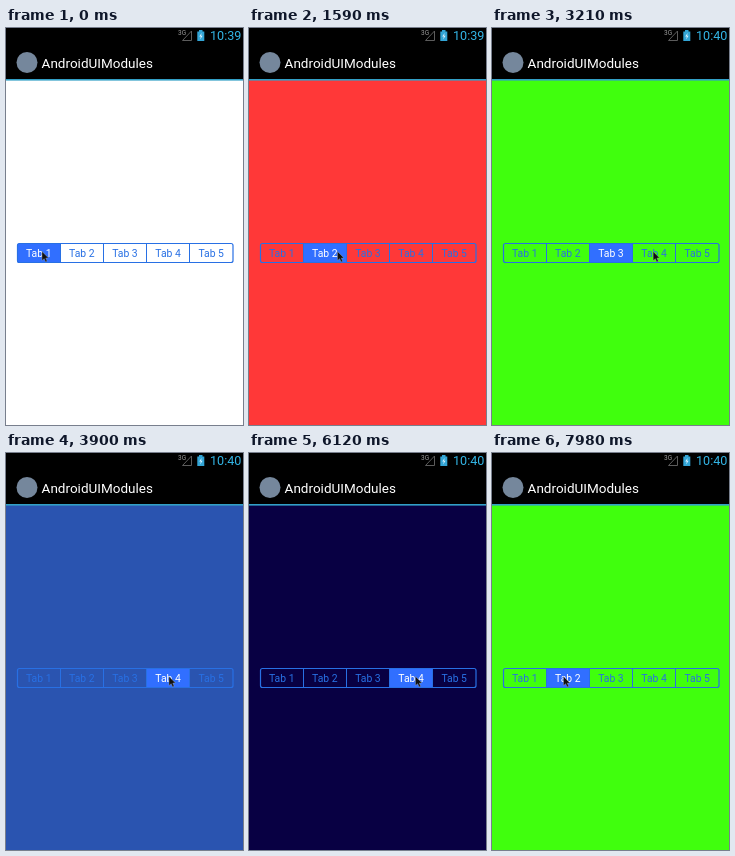
An HTML page that plays this animation: 237x397 px, repeating every 8000 ms.

```html
<!DOCTYPE html>
<html lang="en">
<head>
<meta charset="utf-8">
<style>
  html, body { margin: 0; width: 100%; height: 100%; overflow: hidden; background: #fff; }
  svg { display: block; width: 237px; height: 397px; font-family: Roboto, sans-serif; }
</style>
</head>
<body>
<svg viewBox="0 0 237 397">
  <rect id="page" width="237" height="397"/>
  <rect width="237" height="52" fill="#000"/>
  <rect y="51" width="237" height="1.6" fill="#329fc6"/>

  <text x="172" y="6.8" font-size="6.5" fill="#999">3G</text>
  <path d="M176.5 12.5H185.5V3Z" fill="none" stroke="#5c5c5c"/>
  <path d="M193 2h3.5v1.5h1.8v9.5h-7v-9.5h1.7z" fill="#33a5d6"/>
  <path d="M195.6 5l-2.4 3.4h1.6l-.6 3 2.4-3.6h-1.5z" fill="#d8f2ff"/>
  <text id="clock" x="204" y="12" font-size="12.6" fill="#33b5e5"></text>

  <circle cx="21" cy="34.5" r="10.5" fill="#75879c"/>
  <text x="35.6" y="39.5" font-size="13.5" fill="#fff">AndroidUIModules</text>

  <g id="tabs" font-size="10.4" text-anchor="middle"></g>
  <path id="cursor" d="M0 0V9L2.2 7.2 3.6 10.4 5.1 9.7 3.8 6.6 6.4 6.4Z" fill="#111" stroke="#aaa" stroke-width=".4"/>
</svg>
<script>
const LOOP = 8000, FADE = 500, MOVE = 330, TAB_W = 43.1, LEFT = 11.5;
const INK = '#2870e4', FILL = '#316fff';
const COLORS = [[255, 255, 255], [255, 0, 0], [64, 255, 13], [32, 0, 255], [0, 0, 0]];
const $ = id => document.getElementById(id);

// The cursor reaches x at `arrive`, the tab lights at `pick`, the page starts fading at `fade`.
const steps = [
  { tab: 1, x: 88.5, arrive: 810, pick: 1200, fade: 1200 },
  { tab: 2, x: 115.5, arrive: 2010, pick: 2250, fade: 2330 },
  { tab: 3, x: 163, arrive: 3250, pick: 3330, fade: 3565 },
  { tab: 4, x: 201.5, arrive: 4480, pick: 4560, fade: 4785 },
  { tab: 3, x: 166.5, arrive: 5640, pick: 5730, fade: 5990 },
  { tab: 2, x: 116, arrive: 6700, pick: 6750, fade: 7010 },
  { tab: 1, x: 71.5, arrive: 7500, pick: 7980, fade: LOOP }
];

const clamp = u => Math.min(1, Math.max(0, u));
const smooth = u => u * u * (3 - 2 * u);
const mix = (a, b, u) => a + (b - a) * u;

function add(name, attrs, text = '') {
  const el = document.createElementNS('http://www.w3.org/2000/svg', name);
  for (const key in attrs) el.setAttribute(key, attrs[key]);
  el.textContent = text;
  return $('tabs').appendChild(el);
}

const tabs = COLORS.map((_, i) => {
  const x = LEFT + i * TAB_W;
  return {
    fill: add('rect', { x, y: 215.5, width: TAB_W, height: 19.5, rx: 1, fill: FILL }),
    label: add('text', { x: x + TAB_W / 2 - .3, y: 229 }, 'Tab ' + (i + 1))
  };
});
add('rect', { x: LEFT, y: 215.5, width: 5 * TAB_W, height: 19, rx: 2, fill: 'none', stroke: INK, 'stroke-width': 1.2 });
for (let i = 1; i < 5; i++) {
  add('rect', { x: Math.round(11 + i * TAB_W), y: 215, width: 1, height: 20, fill: INK });
}

function draw(t) {
  let active = 0, x = 36, page = COLORS[0];
  for (const step of steps) {
    const faded = clamp((t - step.fade) / FADE);
    page = page.map((v, i) => mix(v, COLORS[step.tab][i], faded));
    x = mix(x, step.x, smooth(clamp((t - step.arrive) / MOVE + 1)));
    if (t >= step.pick) active = step.tab;
  }
  $('page').setAttribute('fill', `rgb(${page.map(Math.round)})`);
  $('cursor').setAttribute('transform', `translate(${x} 223.5)`);
  $('clock').textContent = t < 1950 ? '10:39' : '10:40';
  tabs.forEach(({ fill, label }, i) => {
    fill.setAttribute('visibility', i === active ? 'visible' : 'hidden');
    label.setAttribute('fill', i === active ? '#fff' : INK);
  });
}

const start = performance.now();
function tick() {
  draw((performance.now() - start) % LOOP);
  requestAnimationFrame(tick);
}
tick();
</script>
</body>
</html>
```
